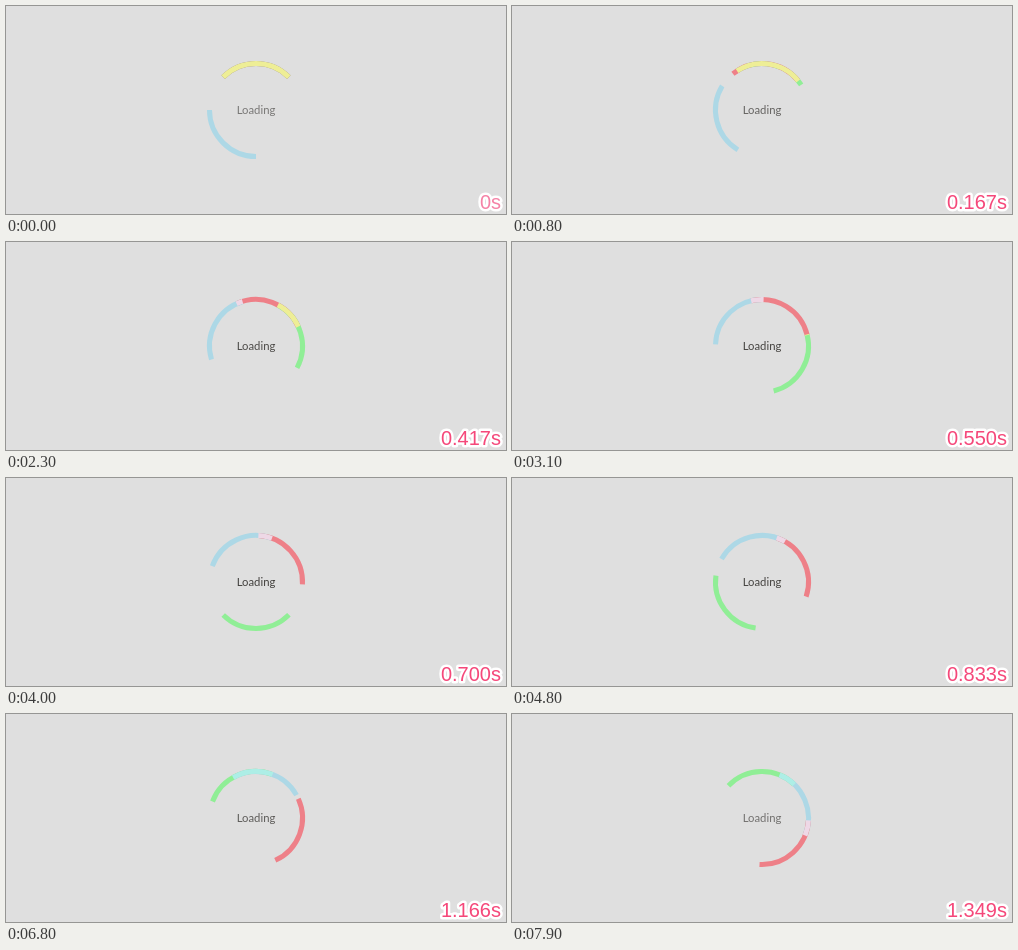
Animation of 500x208 px, one loop 8000 ms. Source, as an HTML page:

```html
<!DOCTYPE html>
<html lang="en">
<head>
<meta charset="utf-8">
<title>Loading</title>
<style>
  html, body { margin: 0; width: 100%; height: 100%; overflow: hidden; background: #dfdfdf; }
  svg { display: block; width: 500px; height: 208px; }
  .rings { isolation: isolate; fill: none; stroke-width: 5; }
  .rings path { mix-blend-mode: lighten; }
  .word { font: 11.3px Lato, "Open Sans", sans-serif; fill: #3a3835; text-anchor: middle; }
  .clock {
    font: 20px "Liberation Sans", Arial, sans-serif; text-anchor: end;
    stroke: #fff; stroke-width: 5; stroke-linejoin: round; paint-order: stroke;
  }
</style>
</head>
<body>
<svg viewBox="0 0 500 208">
  <g class="rings" transform="translate(250 104)">
    <path id="blue" stroke="#add8e6"/>
    <path id="red" stroke="#ee8088"/>
    <path id="green" stroke="#90ee96"/>
  </g>
  <text class="word" id="word" x="250" y="108">Loading</text>
  <text class="clock" id="clock" x="495" y="203"></text>
</svg>
<script>
  const STEP = 100, STEPS = 80, TICK = 0.01666, TURN = 1.4;
  const $ = id => document.getElementById(id);
  const rings = { blue: $('blue'), red: $('red'), green: $('green') };
  const word = $('word'), clock = $('clock');

  // Quarter ring centred on twelve o'clock
  const r = 46.5, d = r * Math.SQRT1_2;
  for (const ring of Object.values(rings))
    ring.setAttribute('d', `M${-d} ${-d}A${r} ${r} 0 0 1 ${d} ${-d}`);

  // Smooth curve through [seconds, degrees] points
  function curve(pts) {
    const last = pts.length - 1;
    const slope = i => {
      const a = pts[Math.max(i - 1, 0)], b = pts[Math.min(i + 1, last)];
      return (b[1] - a[1]) / (b[0] - a[0]);
    };
    return t => {
      let i = 0;
      while (i < last - 1 && t > pts[i + 1][0]) i++;
      const [t0, y0] = pts[i], [t1, y1] = pts[i + 1];
      const h = t1 - t0, u = (t - t0) / h, v = 1 - u;
      return y0 * v * v * (1 + 2 * u) + y1 * u * u * (3 - 2 * u)
        + h * u * v * (v * slope(i) - u * slope(i + 1));
    };
  }

  const angles = {
    blue: curve([[0, 225], [.3, 280], [.55, 317], [.7, 335], [.983, 355], [1.166, 375.5], [1.349, 427]]),
    red: curve([[0, 0], [.3, 12.5], [.55, 31.5], [.7, 48], [.983, 82], [1.166, 110.5], [1.349, 138]]),
    green: t => 180 * (1 - Math.cos(Math.PI * t / TURN))
  };

  function draw(step) {
    const t = step ? (step + 2) * TICK : 0;
    for (const name in rings)
      rings[name].setAttribute('transform', `rotate(${angles[name](t).toFixed(2)})`);
    word.setAttribute('opacity', (.62 + .33 * Math.sin(Math.PI * t / TURN)).toFixed(3));
    clock.textContent = (step ? t.toFixed(3) : '0') + 's';
    clock.setAttribute('fill', step ? '#f5487a' : '#f582a6');
  }

  const start = performance.now();
  function play(now) {
    draw(Math.floor(Math.max(0, now - start) / STEP) % STEPS);
    requestAnimationFrame(play);
  }
  draw(0);
  requestAnimationFrame(play);
</script>
</body>
</html>
```
